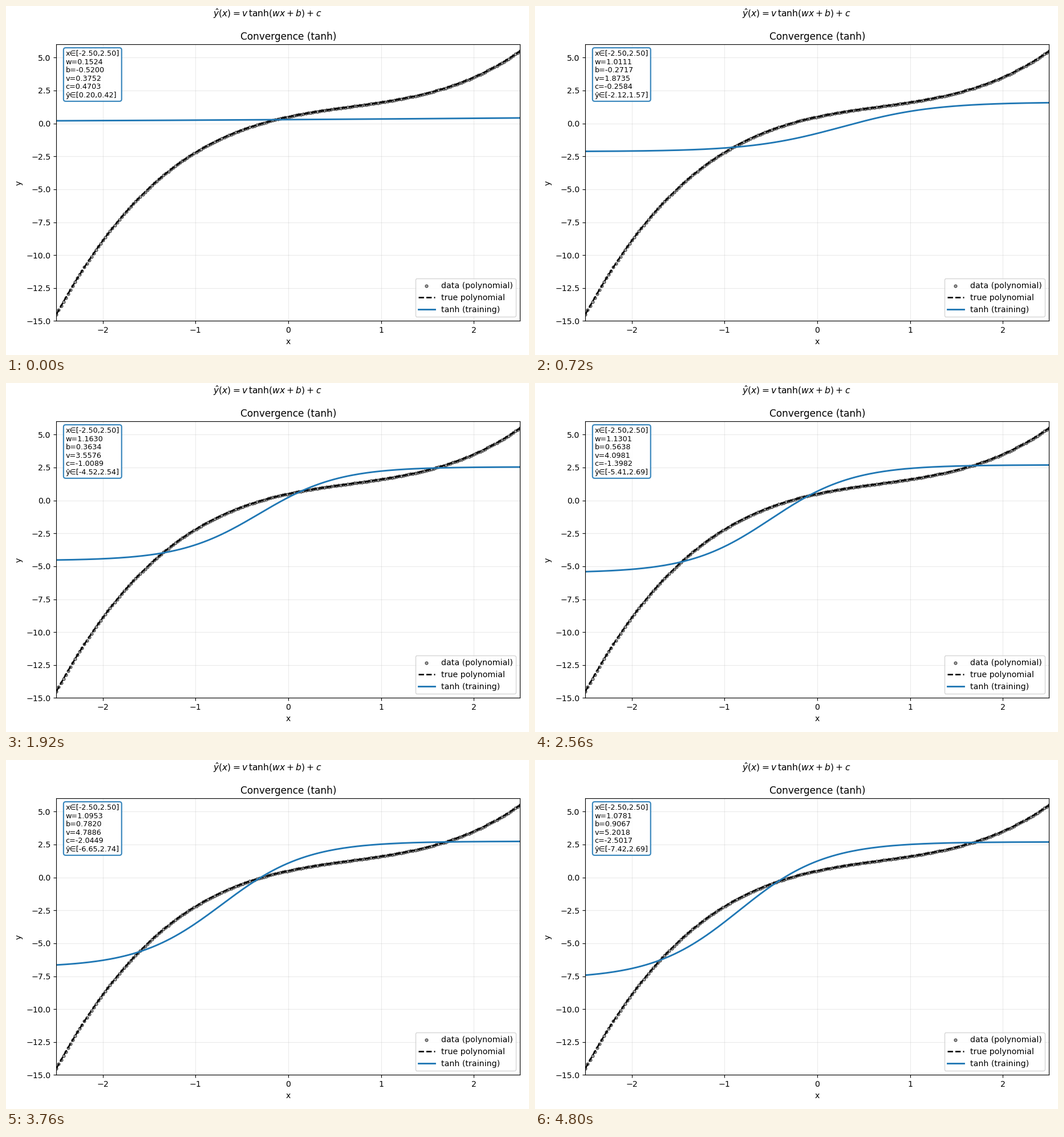
A matplotlib script for the animation above (4880 ms loop, 917x611 px).

```python
import numpy as np
import matplotlib.pyplot as plt
from matplotlib.animation import FuncAnimation

W, H, DPI = 917, 611, 101.9
FRAMES, INTERVAL = 61, 80
FRAME_RATE = 0.04            # learning rate summed over one frame
BLUE = "tab:blue"

# Points (w, b, v, c) the descent passes through, by frame index.
WAYPOINTS = {
    9: (1.0111, -0.2717, 1.8735, -0.2584),
    60: (1.0781, 0.9067, 5.2018, -2.5017),
}


def poly(x):
    return 0.5 + 1.5 * x - 0.8 * x**2 + 0.4 * x**3


def model(x, params):
    w, b, v, c = params
    return v * np.tanh(w * x + b) + c


def gradient(x, y, params):
    """Gradient of the mean squared error."""
    w, b, v, c = params
    t = np.tanh(w * x + b)
    r = 2 * (v * t + c - y) / len(x)
    s = r * v * (1 - t * t)
    return np.array([s @ x, s.sum(), r @ t, r.sum()])


def train(x, steps):
    """Parameters at every frame, with `steps` descent steps per frame."""
    y = poly(x)
    params = 0.5 * np.random.default_rng(42).normal(size=4)
    path = [params]
    for _ in range(FRAMES - 1):
        for _ in range(steps):
            params = params - FRAME_RATE / steps * gradient(x, y, params)
        path.append(params)
    return np.array(path)


def miss(path):
    return sum(np.abs(path[i] - p).sum() for i, p in WAYPOINTS.items())


x = np.linspace(-2.5, 2.5, 200)
path = min((train(x, n) for n in (1, 2, 4, 5, 8, 10, 20)), key=miss)

# The small margin keeps the pixel size from rounding down.
fig = plt.figure(figsize=((W + 1e-4) / DPI, (H + 1e-4) / DPI), dpi=DPI)
left, right, top, bottom = 88.4, 901.4, 67.3, 551.4
ax = fig.add_axes([left / W, 1 - bottom / H, (right - left) / W, (bottom - top) / H])

ax.scatter(x, poly(x), s=12, color="gray", edgecolor="black", lw=0.8, alpha=0.7,
           label="data (polynomial)")
ax.plot(x, poly(x), "k--", lw=1.8, label="true polynomial")
curve, = ax.plot(x, model(x, path[0]), color=BLUE, lw=2, label="tanh (training)")

ax.set(xlim=(-2.5, 2.5), ylim=(-15, 6), xlabel="x", ylabel="y",
       xticks=range(-2, 3), title="Convergence (tanh)")
ax.grid(alpha=0.25)
ax.legend(loc="lower right")
fig.suptitle(r"$\hat{y}(x)=v\,\tanh(wx+b)+c$", fontsize=11, y=0.997)

info = ax.text(0.02, 0.98, "", transform=ax.transAxes, fontsize=9, va="top",
               linespacing=1.16,
               bbox=dict(boxstyle="round,pad=0.3", fc="white", ec=BLUE,
                         lw=1.5, alpha=0.9))


def update(i):
    y = model(x, path[i])
    curve.set_ydata(y)
    lines = [f"x∈[{x[0]:.2f},{x[-1]:.2f}]"]
    lines += [f"{name}={value:.4f}" for name, value in zip("wbvc", path[i])]
    lines.append(f"ŷ∈[{y.min():.2f},{y.max():.2f}]")
    info.set_text("\n".join(lines))
    return curve, info


anim = FuncAnimation(fig, update, frames=FRAMES, interval=INTERVAL,
                     repeat=True, repeat_delay=0)
plt.show()
```
